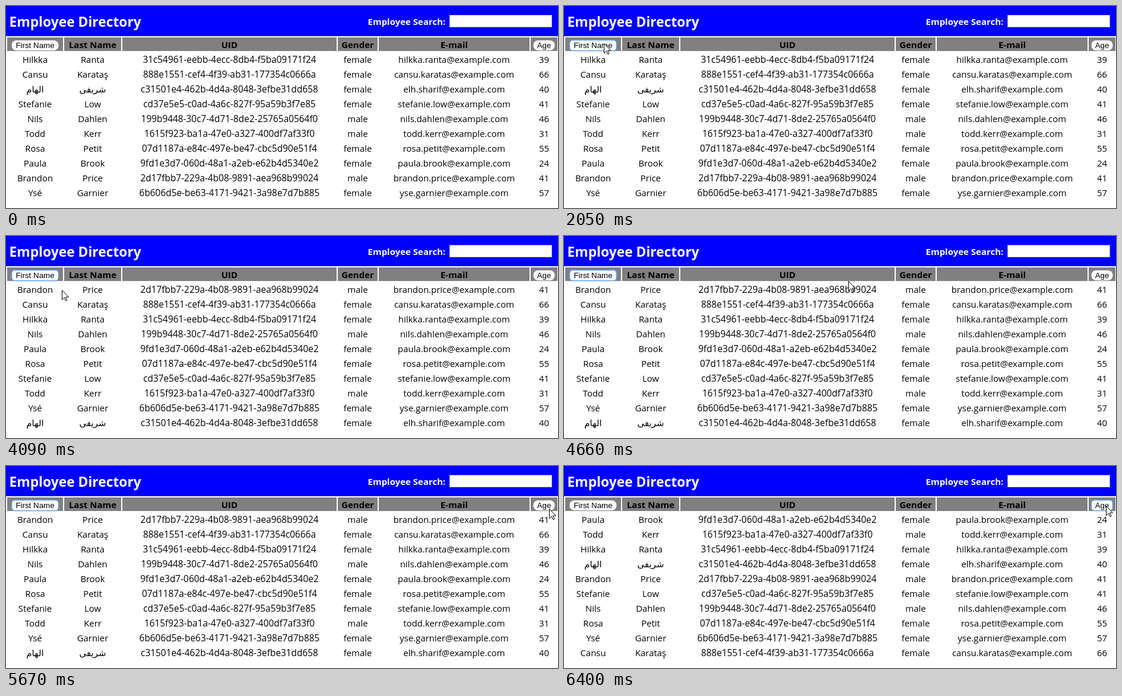
These frames come from a looping animation (930x341 px, 8 s). An HTML page:

```html
<!DOCTYPE html>
<html lang="en">
<head>
<meta charset="utf-8">
<title>Employee Directory</title>
<style>
html, body { margin: 0; width: 100%; height: 100%; overflow: hidden; background: #fff; }
svg { display: block; width: 930px; height: 341px; }
text { font: 14.9px "Open Sans", "Noto Sans", "DejaVu Sans", sans-serif; text-anchor: middle; }
.uid { font-size: 15.4px; }
.bold { font-weight: 700; font-size: 15px; }
.left { text-anchor: start; fill: #fff; }
.title { font-size: 22.8px; }
.button { font: 13.333px "Liberation Sans", Arial, sans-serif; }
</style>
</head>
<body>
<svg id="stage" viewBox="0 0 930 341"></svg>
<script>
const LOOP = 8000;
const stage = document.getElementById('stage');

function add(tag, attrs, text) {
  const el = document.createElementNS('http://www.w3.org/2000/svg', tag);
  for (const key in attrs) el.setAttribute(key, attrs[key]);
  if (text !== undefined) el.textContent = text;
  return stage.appendChild(el);
}
const box = (x, y, width, height, fill, more) => add('rect', { x, y, width, height, fill, ...more });
const label = (x, y, text, cls = '') => add('text', { x, y, class: cls }, text);
const show = (el, on) => el.setAttribute('visibility', on ? 'visible' : 'hidden');

// first name, last name, UID, gender, age, optional mail name
const people = [
  ['Hilkka', 'Ranta', '31c54961-eebb-4ecc-8db4-f5ba09171f24', 'female', 39],
  ['Cansu', 'Karataş', '888e1551-cef4-4f39-ab31-177354c0666a', 'female', 66],
  ['الهام', 'شریفی', 'c31501e4-462b-4d4a-8048-3efbe31dd658', 'female', 40, 'elh.sharif'],
  ['Stefanie', 'Low', 'cd37e5e5-c0ad-4a6c-827f-95a59b3f7e85', 'female', 41],
  ['Nils', 'Dahlen', '199b9448-30c7-4d71-8de2-25765a0564f0', 'male', 46],
  ['Todd', 'Kerr', '1615f923-ba1a-47e0-a327-400df7af33f0', 'male', 31],
  ['Rosa', 'Petit', '07d1187a-e84c-497e-be47-cbc5d90e51f4', 'female', 55],
  ['Paula', 'Brook', '9fd1e3d7-060d-48a1-a2eb-e62b4d5340e2', 'female', 24],
  ['Brandon', 'Price', '2d17fbb7-229a-4b08-9891-aea968b99024', 'male', 41],
  ['Ysé', 'Garnier', '6b606d5e-be63-4171-9421-3a98e7d7b885', 'female', 57]
].map(([first, last, uid, gender, age, mail]) => {
  const plain = `${first}.${last}`.toLowerCase().normalize('NFD').replace(/[\u0300-\u036f]/g, '');
  return { first, last, uid, gender, mail: `${mail || plain}@example.com`, age };
});
const byName = [...people].sort((a, b) => (a.first < b.first ? -1 : 1));
const byAge = [...byName].sort((a, b) => a.age - b.age);

const columns = [
  { key: 'first', from: 2, to: 96, button: 'First Name' },
  { key: 'last', from: 98, to: 194, head: 'Last Name' },
  { key: 'uid', from: 196, to: 557, head: 'UID' },
  { key: 'gender', from: 559, to: 626, head: 'Gender' },
  { key: 'mail', from: 628, to: 882, head: 'E-mail' },
  { key: 'age', from: 884, to: 929, button: 'Age' }
];

// page header
box(0, 0, 930, 51, '#00f');
label(5.5, 35, 'Employee Directory', 'bold left title');
label(609.5, 32, 'Employee Search:', 'bold left');
box(747.5, 15.5, 172, 20, '#fff', { stroke: '#a9a9a9' });

// table
const rings = {};
const cells = people.map(() => ({}));
for (const { key, from, to, head, button } of columns) {
  const mid = (from + to) / 2;
  box(from, 53, to - from, 23, '#808080');
  if (button) {
    const w = key === 'first' ? 79 : 36;
    box(mid - w / 2, 58, w, 17, '#fff', { rx: 8 });
    rings[key] = box(mid - w / 2, 57.5, w, 18, '#fff', { rx: 5, stroke: '#5e9bf3', 'stroke-width': 1.5 });
    label(mid, 71, button, 'button');
  } else {
    label(mid, 71, head, 'bold');
  }
  cells.forEach((row, i) => { row[key] = label(mid, 96 + 25 * i, '', key); });
}

let shown;
function fill(list) {
  if (list === shown) return;
  shown = list;
  list.forEach((person, i) => {
    for (const key in person) cells[i][key].textContent = person[key];
  });
}

// pointer
const click = add('circle', { r: 10, fill: '#fff', 'fill-opacity': 0.5, stroke: '#000' });
const arrow = add('path', {
  d: 'M.5 .5V16.5L4.3 12.9L6.8 18.5L9 17.6L6.6 12H11.5Z', fill: '#fff', stroke: '#000'
});
const beam = add('path', {
  d: 'M0 .5H3M4 .5H7M3.5 1V15M0 15.5H3M4 15.5H7', fill: 'none', stroke: '#000'
});

// time, left, top, 1 for the text beam
const moves = [
  [500, 158, 277], [630, 138, 203, 1], [780, 124, 157], [930, 108, 110],
  [1080, 93, 87], [1210, 80, 69], [1360, 68, 63], [1510, 67, 63],
  [4090, 94, 91], [4230, 217, 96], [4380, 290, 82, 1], [4510, 369, 76, 1],
  [4660, 479, 76], [4810, 602, 75], [4960, 716, 70], [5090, 831, 67],
  [5240, 872, 63], [5390, 913, 60], [5540, 914, 66], [5670, 915, 72],
  [5820, 915, 73], [5970, 913, 70], [6120, 913, 67]
];

function draw(t) {
  fill(t < 2170 ? people : t < 6400 ? byName : byAge);
  show(rings.first, t >= 2050 && t < 6400);
  show(rings.age, t >= 6400);

  const move = moves.filter(m => m[0] <= t).pop();
  show(arrow, move && !move[3]);
  show(beam, move && move[3]);
  show(click, (t >= 1930 && t < 2050) || (t >= 6250 && t < 6400));
  if (!move) return;
  const [, x, y] = move;
  arrow.setAttribute('transform', `translate(${x} ${y})`);
  beam.setAttribute('transform', `translate(${x} ${y})`);
  click.setAttribute('cx', x + 1.5);
  click.setAttribute('cy', y + 1.5);
}

const start = performance.now();
function frame() {
  draw((performance.now() - start) % LOOP);
  requestAnimationFrame(frame);
}
frame();
</script>
</body>
</html>
```
